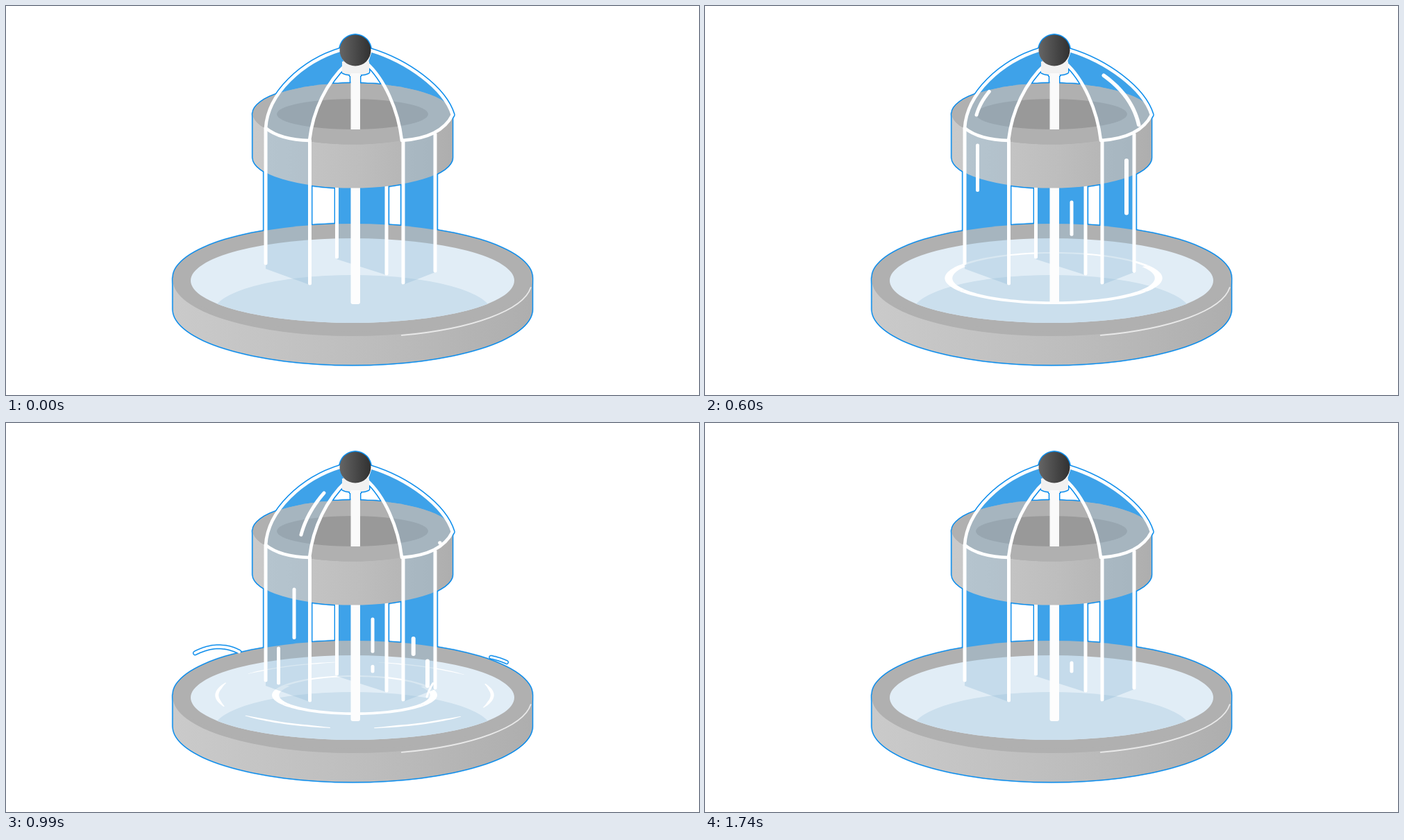
Write an HTML page with a canvas that moves like this. It is 998 by 561 pixels and loops after 1.77 s.

```html
<!DOCTYPE html>
<html lang="en">
<head>
<meta charset="utf-8">
<title>Fountain</title>
<style>
html, body { margin: 0; width: 100%; height: 100%; overflow: hidden; background: #fff; }
canvas { display: block; }
</style>
</head>
<body>
<canvas id="stage" width="998" height="561"></canvas>
<script>
const W = 998, H = 561, LOOP = 1770, STEP = 30;
const BLUE = '#3ea2e9', EDGE = '#0a8cec', GLASS = 'rgba(150,189,217,.37)';

const out = document.getElementById('stage').getContext('2d');
const makeLayer = () => {
  const c = document.createElement('canvas');
  c.width = W; c.height = H;
  return c.getContext('2d');
};
const g = makeLayer(), mask = makeLayer();

const leftDome = new Path2D('M483 63C427 80 377 126 374 176Q395 193 437 194C442 150 462 110 490 84Z');
const rightDome = new Path2D('M525 64C577 80 631 118 643 157C630 183 600 192 570 194C565 150 545 105 519 82Z');
const leftPanel = new Path2D('M374 176Q395 193 437 194V402L374 379Z');
const rightPanel = new Path2D('M572 194Q600 192 618 183V384L572 402Z');
const backPanel = new Path2D('M476 250H548V388L476 365Z');
const cap = new Path2D('M484 80V96Q489 99 495 99V101H511V99Q518 99 523 96V80Z');

const clamp = v => Math.min(1, Math.max(0, v));

function fill(path, color) {
  g.fillStyle = color;
  g.fill(path);
}

function disc(x, y, rx, ry, color) {
  g.beginPath();
  g.ellipse(x, y, rx, ry, 0, 0, 7);
  g.fillStyle = color;
  g.fill();
}

function glass(...paths) {
  g.globalCompositeOperation = 'source-atop';
  paths.forEach(p => fill(p, GLASS));
  g.globalCompositeOperation = 'source-over';
}

function post(x, y0, y1) {
  g.lineWidth = 5;
  g.beginPath();
  g.moveTo(x, y0);
  g.lineTo(x, y1);
  g.stroke();
}

function shade(x0, x1, a, b, c) {
  const s = g.createLinearGradient(x0, 0, x1, 0);
  s.addColorStop(0, a);
  s.addColorStop(.55, b);
  s.addColorStop(1, c);
  return s;
}

// Round wall with a rim whose far edge is raised by lift.
function basin(x, y, rx, ry, depth, lift) {
  g.beginPath();
  g.moveTo(x - rx, y - lift);
  g.lineTo(x - rx, y + depth);
  g.ellipse(x, y + depth, rx, ry, 0, Math.PI, 0, true);
  g.lineTo(x + rx, y - lift);
  g.fillStyle = shade(x - rx, x + rx, '#cacaca', '#bdbdbd', '#aeaeae');
  g.fill();
  disc(x, y, rx, ry, '#b0b0b0');
  disc(x, y - lift, rx, ry - lift / 2, '#b0b0b0');
}

// White dash running at even speed along a cubic curve.
function dash(t, start, dur, lag, linger, w, p) {
  const b = clamp((t - start) / dur), a = clamp((t - start - lag) / dur);
  if (t <= start || t > start + lag + dur + linger) return;
  g.lineWidth = w;
  g.beginPath();
  for (let i = 0; i <= 24; i++) {
    const u = a + (b - a) * i / 24 + i * 1e-5, v = 1 - u;
    const at = k => v * v * v * p[k] + 3 * v * v * u * p[k + 2] + 3 * v * u * u * p[k + 4] + u * u * u * p[k + 6];
    g.lineTo(at(0), at(1));
  }
  g.stroke();
}

const flow = (t, start, dur, w, path) => dash(t, start, dur, 265, 140, w, path);
const splash = (t, start, w, path) => dash(t, start, 300, 140, 0, w, path);

function drop(t, start, dur, w, x, top, bottom) {
  const d = (bottom - top) / 3;
  flow(t, start, dur, w, [x, top, x, top + d, x, bottom - d, x, bottom]);
}

// Widening ring, thickest at its sides, that breaks into arcs late in life.
function ripple(age, life, r0, speed) {
  const u = age / life;
  if (u <= 0 || u >= 1) return;
  const rx = r0 + speed * age, ry = rx * .24;
  const w = 11 * Math.sin(u * Math.PI) ** .6;
  const gap = Math.max(0, u - .55) * 25;
  g.fillStyle = '#fff';
  for (let i = 0; i < 6; i++) {
    const from = -29 + i * 60 + gap, span = 60 - 2 * gap;
    const thin = i > 3 ? .55 : 1;
    const pts = [];
    for (let k = 0; k <= 20; k++) {
      const a = (from + span * k / 20) * Math.PI / 180;
      const ends = gap ? Math.min(1, .35 + Math.sin(k / 20 * Math.PI)) : 1;
      pts.push([Math.cos(a), Math.sin(a), ends * thin]);
    }
    g.beginPath();
    pts.forEach(([c, s]) => g.lineTo(502 + c * rx, 392.5 + s * ry));
    pts.reverse().forEach(([c, s, e]) =>
      g.lineTo(502 + c * (rx - w * e), 392.5 + s * (ry - (w * .22 + 1.4) * e)));
    g.fill();
  }
}

function pool(t) {
  basin(499.2, 396, 258.6, 80, 41.5, 4);
  disc(499, 396, 233, 61, '#e1edf6');
  g.save();
  g.beginPath();
  g.ellipse(499, 396, 233, 61, 0, 0, 7);
  g.clip();
  disc(499, 442, 200, 54, '#cbdfed');
  g.restore();

  g.strokeStyle = 'rgba(240,240,240,.9)';
  g.lineWidth = 1.8;
  g.beginPath();
  g.ellipse(499, 398, 258, 80, 0, .1, 1.293);
  g.stroke();

  ripple(t - 240, 820, 116, .113);
  ripple(t - 670, 930, 94, .078);
}

function tower() {
  g.strokeStyle = '#fff';
  glass(backPanel);
  post(476.5, 250, 362);
  post(548, 250, 386);
  g.fillStyle = '#fdfdfd';
  g.beginPath();
  g.roundRect(496.5, 200, 13.5, 230, 3);
  g.fill();

  basin(499.2, 155.5, 143.7, 44, 63, 0);
  disc(499, 156, 109, 22, '#999');
  g.fillStyle = '#fafafa';
  g.fillRect(496.5, 92, 13.5, 86);

  glass(leftDome, rightDome, leftPanel, rightPanel);
  g.globalCompositeOperation = 'destination-over';
  [leftDome, rightDome, leftPanel, rightPanel, backPanel].forEach(p => fill(p, BLUE));
  g.globalCompositeOperation = 'source-over';

  g.lineWidth = 4.6;
  g.stroke(leftDome);
  g.stroke(rightDome);
  post(374, 176, 371);
  post(437.5, 194, 400);
  post(572, 194, 399);
  post(618, 185, 382);

  fill(cap, '#f1f1f1');
  g.fillStyle = '#fafafa';
  g.fillRect(496.5, 97, 13.5, 12);
  disc(503, 64, 22.5, 22.5, shade(481, 526, '#646464', '#474747', '#303030'));
}

function water(t) {
  flow(t, 66, 430, 5, [470, 80, 430, 98, 400, 125, 391, 157]);
  flow(t, 625, 430, 5, [477, 83, 448, 106, 426, 142, 422, 177]);
  flow(t, 190, 415, 5.5, [530, 76, 575, 95, 615, 125, 625, 173]);

  drop(t, 465, 365, 5, 392.5, 201, 375);
  drop(t, 725, 511, 5, 415, 240, 374);
  drop(t, 391, 432, 6, 607, 223, 379);
  drop(t, 837, 493, 6, 586.7, 311, 381.5);
  for (let i = 0; i < 3; i++) drop(t, 278 + i * 390, 486, 5, 528, 273, 358);

  splash(t, 711, 4, [380, 384, 358, 330, 312, 304, 262, 338]);
  splash(t, 1050, 4, [380, 384, 355, 338, 325, 318, 260, 356]);
  splash(t, 597, 3.2, [618, 383, 635, 350, 670, 322, 721, 345]);
  splash(t, 936, 3, [606, 395, 618, 355, 655, 335, 711, 369]);
}

function draw(t) {
  g.clearRect(0, 0, W, H);
  g.lineJoin = 'round';
  g.lineCap = 'round';
  pool(t);
  tower();
  water(t);

  // blue contour around the whole shape
  mask.globalCompositeOperation = 'copy';
  mask.drawImage(g.canvas, 0, 0);
  mask.globalCompositeOperation = 'source-in';
  mask.fillStyle = EDGE;
  mask.fillRect(0, 0, W, H);

  out.fillStyle = '#fff';
  out.fillRect(0, 0, W, H);
  for (let i = 0; i < 8; i++) {
    const a = i * Math.PI / 4;
    out.drawImage(mask.canvas, Math.cos(a) * 1.4, Math.sin(a) * 1.4);
  }
  out.drawImage(g.canvas, 0, 0);
}

const begin = performance.now();
function tick() {
  const t = (performance.now() - begin) % LOOP;
  draw(Math.floor(t / STEP) * STEP);
  requestAnimationFrame(tick);
}
tick();
</script>
</body>
</html>
```
